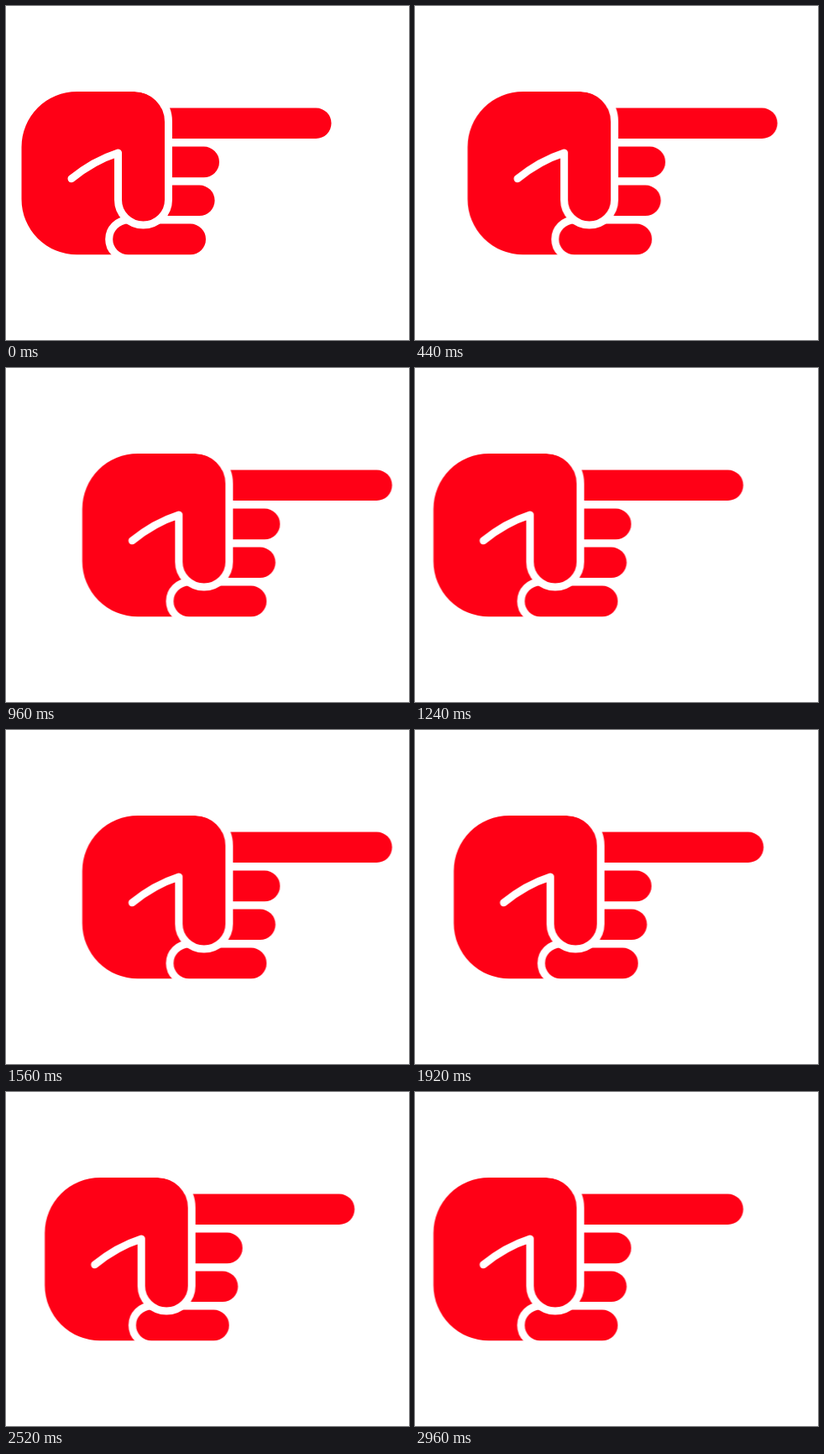
Animation, 480 px wide and 398 px high, one loop 3 s. Source, as an HTML page without scripts:

```html
<!DOCTYPE html>
<html lang="en">
<head>
<meta charset="utf-8">
<title>Pointing hand</title>
<style>
html, body { margin: 0; width: 100%; height: 100%; overflow: hidden; background: #fff; }
svg { display: block; width: 100%; height: 100%; }
.hand { fill: #ff0016; animation: nudge 600ms step-end infinite; }
.pinky { stroke: #fff; stroke-width: 18; paint-order: stroke; }
.crease { fill: none; stroke: #fff; stroke-width: 9; stroke-linecap: round; stroke-linejoin: round; }

/* x = 40 * (1 - cos(phase)), held at 25 steps per second */
@keyframes nudge {
  0%, 100% { transform: translateX(0); }
  6.6%, 93.3% { transform: translateX(3.46px); }
  13.3%, 86.6% { transform: translateX(13.23px); }
  19.95%, 79.95% { transform: translateX(27.64px); }
  26.6%, 73.3% { transform: translateX(44.18px); }
  33.3%, 66.6% { transform: translateX(60px); }
  39.95%, 59.95% { transform: translateX(72.36px); }
  46.6%, 53.3% { transform: translateX(79.13px); }
}
</style>
</head>
<body>
<svg viewBox="0 0 480 398" role="img" aria-label="Hand pointing right">
  <g class="hand">
    <rect x="160" y="121.5" width="227.5" height="36.5" rx="18.25"/>
    <rect x="160" y="167.5" width="94" height="36.8" rx="18.4"/>
    <rect x="160" y="213.5" width="88.6" height="36.6" rx="18.3"/>
    <path d="M84.5 101.9H153a36 36 0 0 1 36 36V231H145V296.3H84.5a66 66 0 0 1-66-66V167.9a66 66 0 0 1 66-66z"/>
    <rect class="pinky" x="127.2" y="259.5" width="110.8" height="36.8" rx="18.4"/>
    <path d="M136 200V231a27 27 0 0 0 55 0V200z"/>
    <path class="crease" d="M78 205.8Q104 184.5 133.5 175V231a30 30 0 0 0 60 0V137.9a40.5 40.5 0 0 0-40.5-40.5"/>
  </g>
</svg>
</body>
</html>
```
